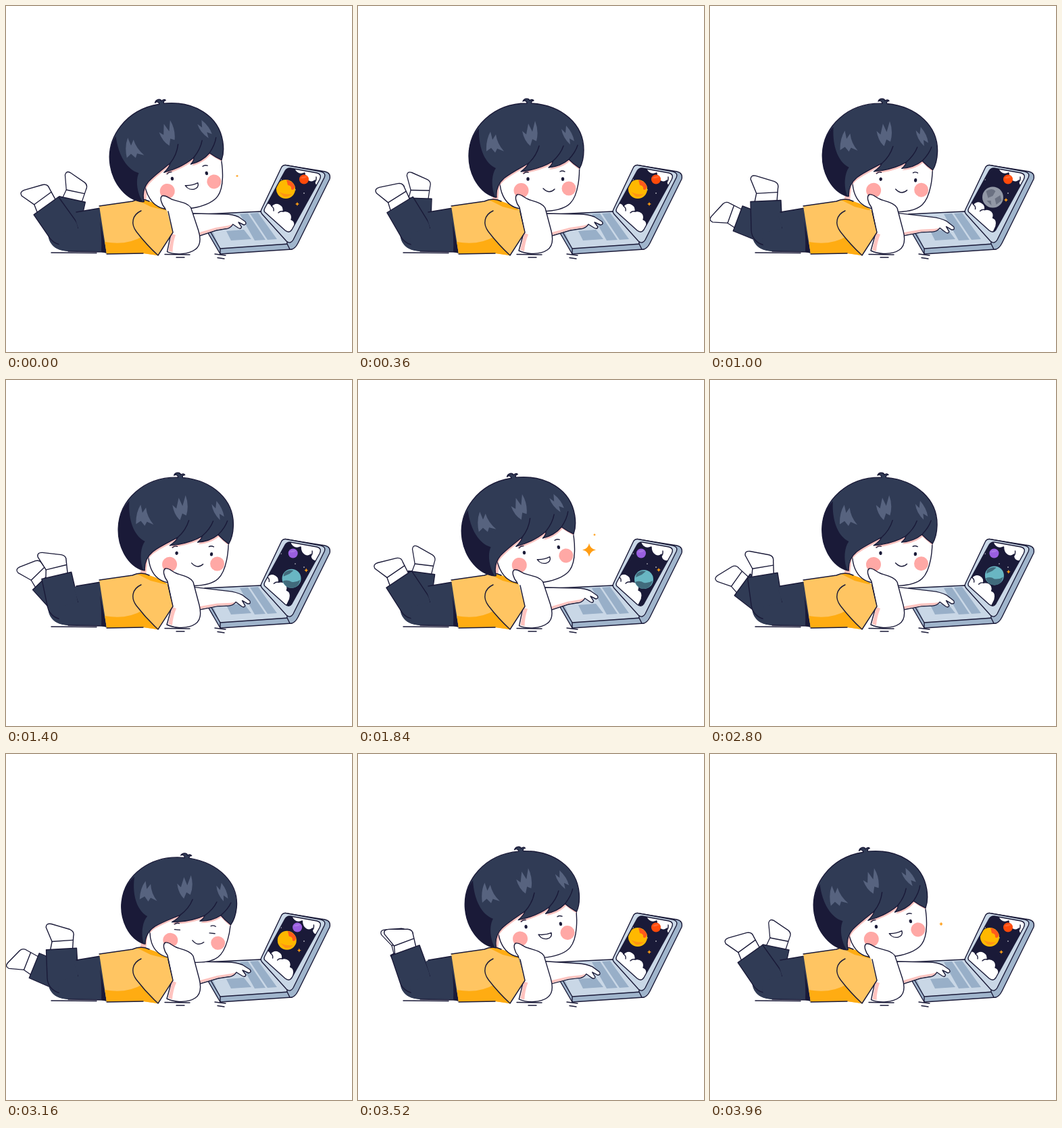
An HTML page for the animation above (4 s loop, 512x512 px).

```html
<!DOCTYPE html>
<html lang="en">
<head>
<meta charset="utf-8">
<title>Boy with a laptop</title>
<style>
  html, body { margin: 0; width: 100%; height: 100%; overflow: hidden; background: #fff; }
  svg { display: block; width: 100%; height: 100%; }
  .line { fill: none; stroke: #1a1a38; stroke-width: 1.4; stroke-linecap: round; stroke-linejoin: round; }
  .skin { fill: #fff; }
  .pants { fill: #303b55; }
  .dark { fill: #1a1a38; }
  .shine { fill: #57637f; }
  .blush { fill: #ffa8a5; }
  .shade { fill: #ffc3bf; }
  .shirt { fill: #ffc562; }
  .shirtShade { fill: #ffac12; }
  .key { fill: #98afc8; }
</style>
</head>
<body>
<svg viewBox="0 0 512 512">
  <defs>
    <g id="leg" class="line">
      <path class="skin" d="M67 290L70 277 62 256Q62 249 70 251L97 260Q104 263 102 270L100 290Z"/>
      <path d="M70 277L101 276"/>
      <path class="pants" d="M61 289L106 288 107 331A23 23 0 0 1 61 331Z"/>
    </g>
    <path id="face" d="M212 245C206 270 215 296 240 300C262 306 300 306 314 292C326 280 329 250 327 228L230 212Z"/>
    <path id="hair" d="M203 283C180 277 164 250 164 222C164 180 200 144 250 144C250 141 247 139 244 141C246 136 253 136 254 140C256 138 259 138 260 140C257 140 256 142 257 144C302 147 334 175 334 213C334 225 332 233 328 240C322 236 317 232 312 227C305 233 295 238 282 239C287 235 288 233 288 230C275 238 258 243 241 245C248 240 251 236 252 233C238 241 226 247 216 255C207 263 204 272 205 283Z"/>
    <path id="star" d="M0-1Q.15-.15 1 0Q.15.15 0 1Q-.15.15-1 0Q-.15-.15 0-1Z" fill="#ff9d14"/>
    <path id="screen" d="M421 240L460 247Q468 249 464 257L423 331Q419 337 413 332L383 305Q381 303 383 299L413 244Q416 239 421 240Z"/>
    <clipPath id="faceClip"><use href="#face"/></clipPath>
    <clipPath id="screenClip"><use href="#screen"/></clipPath>
    <clipPath id="torsoClip"><use href="#torso"/></clipPath>
  </defs>

  <path class="line" d="M67 365L134 365.500M235 367.500L272 368M252 372H264M309 367L325 369M313 372.500L323 374"/>

  <use id="farLeg" href="#leg"/>
  <path class="pants" d="M104 305L141 299 149 364 92 363C70 362 61 350 62 331Z"/>
  <use id="nearLeg" href="#leg"/>
  <path class="pants" d="M100 307L141 299 149 364 92 363C78 361 75 350 80 335L107 329Z"/>
  <path class="dark" d="M139 318L149 366 141 364Q142 342 139 318Z"/>
  <path class="line" d="M104 305L140 299M149 364L92 363"/>

  <path class="shade" d="M203 262L198 290 248 304 240 270Z"/>
  <path class="skin" d="M210 262L207 290 248 304 240 270Z"/>
  <path id="torso" class="shirt" d="M138 296L187 289Q200 283 212 289Q228 294 240 303L247 335 224 369 203 366 149 367Z"/>
  <g clip-path="url(#torsoClip)" class="shirtShade">
    <path d="M146 349Q178 355 202 341L230 374H146Z"/>
    <path d="M192 286Q202 282 212 288Q228 292 242 304L214 297Z"/>
  </g>
  <path class="line" d="M138 296L187 289Q200 283 212 289M149 367L203 366"/>

  <g class="line">
    <path fill="#a0b5cc" d="M294 308L378 304 421 350 423 360 317 367 299 336Z"/>
    <path fill="#c9d7e6" stroke="none" d="M295 309L378 305 419 351 317 359Z"/>
    <path d="M299 328L317 359 419 352M317 359V367"/>
    <path fill="#a0b5cc" d="M413 235.500L472 245Q481 247 479 256L432 351Q427 361 420 360L416 352Z"/>
    <path fill="#c9d7e6" d="M414 235.500L466 245Q474 247 471 254L425 346Q421 353 415 348L379 308Q376 305 378 301L407 240Q409 235 414 235.500Z"/>
  </g>
  <path class="key" d="M346 308L358 307 384 346 368 347ZM361 307L373 306 401 345 387 346ZM326 333L352 331 363 345 333 347Z"/>

  <g clip-path="url(#screenClip)">
    <use href="#screen" class="dark"/>
    <g fill="#fff">
      <circle cx="407" cy="257" r=".8"/><circle cx="428" cy="272" r=".7"/><circle cx="441" cy="277" r=".8"/>
    </g>
    <g id="topCloud" class="line">
      <path class="skin" d="M426 230C424 246 434 251 442 247C442 259 452 263 457 258C456 267 464 270 470 266L490 262V230Z"/>
      <path d="M453 262Q460 261 459 253"/>
    </g>
    <g id="smallPlanet"><circle id="smallDisc" r="7"/><path d="M-6-2Q0-6 5-4Q0 0-6-2Z" fill="#fff" opacity=".15"/></g>
    <g id="bottomCloud" class="line">
      <path class="skin" d="M370 302C380 289 391 290 393 296C400 288 412 294 410 304C418 302 425 308 422 316C429 318 428 328 424 334L410 360 360 310Z"/>
      <path d="M393 296Q397 299 396 303M410 304Q406 303 403 306"/>
    </g>
    <g id="bigPlanet">
      <g id="sun"><circle r="14" fill="#ffb800"/><path d="M1-14Q10-12 13.500-4Q12 3 8 0Q9-5 3-6Z" fill="#ff5a1c"/><path d="M-10 4Q0 9 9 7Q5 12-3 11Z" fill="#ff9414"/></g>
      <g id="moon"><circle r="15.500" fill="#9298a6"/><path d="M-10-9Q-1-15 4-9L0-2-7 1ZM3 2L11-3 13 5 5 11ZM-9 5L-3 5-2 12Z" fill="#6b7182"/></g>
      <g id="earth"><circle r="14" fill="#69b6c3"/><path d="M-11-8Q-5-14 3-12L-3-7-12-3ZM-13 4Q-6 1 0 5Q7 6 13 2Q10 14 0 14Q-9 14-13 4Z" fill="#416b7c"/></g>
    </g>
    <use id="screenStar" href="#star"/>
  </g>
  <use href="#screen" class="line"/>

  <g id="typingArm" class="line">
    <path class="skin" d="M276 307L328 308Q340 308 350 312L361 319Q364 323 359 324L350 320 355 327Q354 331 349 328L341 323Q336 330 327 330L314 332 287 340 276 332Z"/>
    <path class="shade" stroke="none" d="M283 336L313 328 333 325Q337 324 340 323Q336 329 327 329L314 331 287 339Z"/>
  </g>

  <g id="head">
    <use href="#face" class="line" style="fill:#fff"/>
    <g clip-path="url(#faceClip)"><use href="#hair" class="shade" x="1" y="3"/></g>
    <circle class="blush" cx="241.500" cy="273" r="11"/><circle class="blush" cx="312" cy="270" r="10.500"/>
    <path class="line" d="M245 248Q248 245 252 246M299 245Q302 243 306 245"/>
    <g id="openEyes" class="dark"><ellipse cx="251.500" cy="256" rx="2.200" ry="2.800"/><ellipse cx="303" cy="256" rx="2.200" ry="2.800"/></g>
    <path id="closedEyes" class="line" d="M246 256H254M298 256H306"/>
    <path id="smile" class="line" d="M274 270Q283 279 291 271"/>
    <path id="openMouth" class="line" style="fill:#fff" d="M269 269Q279 271 288 268C290 278 274 280 269 269Z"/>
    <use href="#hair" class="pants"/>
    <path class="dark" d="M164 222C164 203 171 189 179 181C178 210 188 233 204 240C197 250 197 270 203 283C180 277 164 250 164 222Z"/>
    <path class="shine" d="M190 215Q189 198 196 186L199 198 204 190Q206 204 216 215L206 211 203 217 197 210ZM243 185L249 190 252 174 258 186 262 170Q268 185 264 200L258 197 255 207Q246 200 243 185ZM301 182L307 188 308 177Q318 188 320 200L313 196 314 205Q303 195 301 182Z"/>
    <path class="line" d="M252 233Q264 222 268 207M288 230Q300 219 304 207M312 227Q322 216 325 206"/>
    <use href="#hair" class="line"/>
  </g>

  <g id="restingArm" class="line">
    <path class="skin" d="M236 279C231 281 234 292 239 298L246 333 238 362C250 368 270 368 280 361C289 355 289 345 286 333L277 299C272 291 262 290 252 286C246 284 242 278 236 279Z"/>
    <path class="shade" stroke="none" d="M246 336L240 361 246 363Q247 350 252 338Z"/>
  </g>
  <path class="shirt" d="M203 302L238 302 247 335 225 369 194 337Q182 320 192 308Z"/>
  <path class="line" d="M200 303C187 309 184 322 193 334C203 347 213 358 225 369L247 335 240 304"/>

  <use id="sparkle" href="#star"/>
  <use id="spark" href="#star"/>
</svg>
<script>
const LOOP = 4000, BEAT = 2000, STEP = 40;
const part = id => document.getElementById(id);
const move = (id, transform) => part(id).setAttribute('transform', transform);
const show = (id, opacity) => part(id).setAttribute('opacity', +opacity);
const clamp = v => Math.min(1, Math.max(0, v));
const mix = (a, b, k) => a + (b - a) * k;
const wave = (t, period) => (1 - Math.cos(2 * Math.PI * t / period)) / 2;

// Eased value at time t through [time, value] pairs
function track(t, ...keys) {
  const next = keys.findIndex(k => k[0] > t);
  if (next === 0) return keys[0][1];
  if (next < 0) return keys.at(-1)[1];
  const [t0, v0] = keys[next - 1], [t1, v1] = keys[next];
  const x = (t - t0) / (t1 - t0);
  return mix(v0, v1, x * x * (3 - 2 * x));
}

function drawBoy(t) {
  const swing = wave(t - 60, BEAT) ** 1.3;
  move('nearLeg', `rotate(${mix(-34.5, -1, swing)} 83 331)`);
  move('farLeg', `rotate(${mix(14, -69, swing)} 86 333) translate(13 -4) scale(.88 1)`);

  const tilt = track(t, [60, -9], [340, 0], [1000, 1.9], [1180, 6], [1260, 6], [1660, -9]);
  const lookUp = clamp(-tilt / 9);
  const nod = clamp((tilt - 1.9) / 4.1);
  move('head', `translate(246 ${291 + 2 * nod}) rotate(${tilt}) scale(1 ${1 - .045 * nod}) translate(-246 -291)`);
  move('restingArm', `rotate(${-3.5 * lookUp} 265 355)`);
  show('openMouth', lookUp > .5);
  show('smile', lookUp <= .5);
  show('closedEyes', tilt > 4);
  show('openEyes', tilt <= 4);

  const tap = 16 * wave(t - 360, 200) * (1 - lookUp);
  move('typingArm', `translate(283 318) rotate(${tap}) scale(${1 - .09 * lookUp} 1) translate(-283 -318)`);

  const big = track(t, [0, 2], [60, 0], [1640, 0], [1820, 10], [1860, 10], [1960, 3], [2000, 2]);
  const small = track(t, [1640, 0], [1760, 3], [1840, 2], [1900, 0]);
  move('sparkle', `translate(342 251.5) scale(${big})`);
  move('spark', `translate(350 229) scale(${small})`);
}

function drawScreen(t) {
  const drift = track(t, [500, 0], [1000, .5], [1500, 1], [2600, 1], [3160, .2], [3400, 0]);
  const slide = track(t, [1000, 0], [1600, 1], [2700, 1], [3160, .45], [3500, 0]);
  move('bigPlanet', `translate(${mix(414, 423, drift)} ${mix(271, 295, drift)})`);
  move('smallPlanet', `translate(${mix(441, 419, slide)} 256.5)`);
  move('topCloud', `translate(${-8 * slide} 0)`);
  move('bottomCloud', `translate(${-7 * drift} ${-5 * drift})`);
  move('screenStar', `translate(${mix(431, 445, drift)} ${mix(293, 281, drift)}) scale(3)`);
  show('sun', track(t, [700, 1], [900, 0], [2800, 0], [3000, 1]));
  show('moon', track(t, [700, 0], [900, 1], [1200, 1], [1400, 0]));
  show('earth', track(t, [1200, 0], [1400, 1], [2800, 1], [3000, 0]));
  part('smallDisc').setAttribute('fill', t > 1300 && t < 3300 ? '#9a5fe0' : '#ff4a0a');
}

function frame(now) {
  const t = Math.floor(now % LOOP / STEP) * STEP;
  drawBoy(t % BEAT);
  drawScreen(t);
  requestAnimationFrame(frame);
}
frame(performance.now());
</script>
</body>
</html>
```
